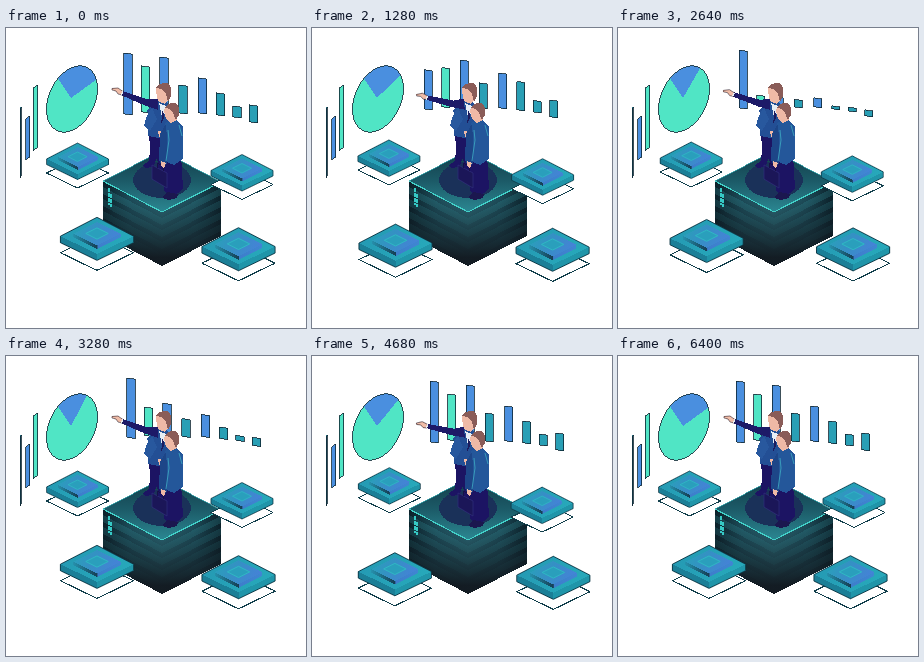
Recreate the animation shown at these times as an HTML page. Size 300x300 px, loop 6440 ms.

```html
<!DOCTYPE html>
<html lang="en">
<head>
<meta charset="utf-8">
<style>
html, body { margin: 0; width: 100%; height: 100%; overflow: hidden; background: #fff; }
svg { display: block; width: 100%; height: 100%; shape-rendering: crispEdges; }
</style>
</head>
<body>
<svg viewBox="0 0 300 300">
  <defs>
    <linearGradient id="leftSide">
      <stop stop-color="#0b2029"/><stop offset=".45" stop-color="#1c4a57"/><stop offset="1" stop-color="#2a6876"/>
    </linearGradient>
    <linearGradient id="rightSide">
      <stop stop-color="#2a6876"/><stop offset=".55" stop-color="#1c4a57"/><stop offset="1" stop-color="#0b2029"/>
    </linearGradient>
    <linearGradient id="fade" x2="0" y2="1">
      <stop offset=".2" stop-color="#12181f" stop-opacity="0"/><stop offset=".9" stop-color="#12181f" stop-opacity=".95"/>
    </linearGradient>
    <linearGradient id="lid" x2="0" y2="1">
      <stop stop-color="#123c49"/><stop offset=".5" stop-color="#1c5b68"/><stop offset="1" stop-color="#2b8792"/>
    </linearGradient>
    <linearGradient id="tile" x2="1" y2=".4">
      <stop stop-color="#2497b2"/><stop offset="1" stop-color="#27a8ba"/>
    </linearGradient>
    <linearGradient id="chip" x2="1" y2=".3">
      <stop stop-color="#27a3b8"/><stop offset=".5" stop-color="#3590c4"/><stop offset="1" stop-color="#4483d6"/>
    </linearGradient>
    <linearGradient id="chipSide">
      <stop stop-color="#2690ac"/><stop offset=".5" stop-color="#153f55"/><stop offset=".52" stop-color="#3d7ecb"/><stop offset="1" stop-color="#3f86d2"/>
    </linearGradient>
    <g id="platform" stroke-linejoin="round">
      <path d="M0 15L31 30 0 45-31 30Z" fill="#fff" stroke="#123f4c"/>
      <path d="M-31 16V21.5L0 36.5V31Z" fill="#1b7f97"/>
      <path d="M31 16V21.5L0 36.5V31Z" fill="#2095a9"/>
      <path d="M0 0L31 16 0 31-31 16Z" fill="url(#tile)"/>
      <path d="M0 0L31 16V21.5L0 36.5-31 21.5V16Z" fill="none" stroke="#0f3a48" stroke-width=".8"/>
      <path d="M-20 14V17L0 27 20 17V14Z" fill="url(#chipSide)"/>
      <path d="M0 4L20 14 0 24-20 14Z" fill="url(#chip)"/>
      <path d="M0 9L9.5 13.7 0 18.5-9.5 13.7Z" fill="#2a9fbc" stroke="#2fb9c4" stroke-width=".8"/>
    </g>
    <clipPath id="pie"><ellipse rx="23" ry="35" transform="rotate(25)"/></clipPath>
  </defs>

  <g stroke="#0c2430" stroke-width=".8">
    <path d="M14 80L15.3 78.5V148L14 150Z" fill="#1d6f80"/>
    <path d="M19.7 91L23.7 88V129L19.7 132Z" fill="#4a8fdf"/>
    <path d="M27 60L31.7 57V119L27 123Z" fill="#50e5c5"/>
  </g>
  <g transform="translate(66 71)">
    <g clip-path="url(#pie)">
      <path d="M-40-40H40V40H-40Z" fill="#50e5c5"/>
      <path id="slice" fill="#4a8fdf"/>
    </g>
    <ellipse rx="23" ry="35" transform="rotate(25)" fill="none" stroke="#0c2430" stroke-width=".8"/>
  </g>
  <g id="bars" stroke="#0c2430" stroke-width=".8"></g>

  <g>
    <path d="M97 153L156 184V238L97 207Z" fill="url(#leftSide)"/>
    <path d="M215 154L156 184V238L215 208Z" fill="url(#rightSide)"/>
    <g id="layers" fill="#36a0a8"></g>
    <path d="M97 153L156 184 215 154V208L156 238 97 207Z" fill="url(#fade)"/>
    <path d="M156 123L215 154 156 184 97 153Z" fill="url(#lid)" stroke="#2a9ca3" stroke-width=".8"/>
    <path d="M97 153L156 184 215 154" fill="none" stroke="#42d0c8" stroke-width="1.2"/>
    <ellipse cx="156" cy="152" rx="29" ry="18" fill="#1a3159"/>
    <path d="M103 160V177M105 166V179" stroke="#36c9c5" stroke-width="1.2" stroke-dasharray="4 1"/>
  </g>

  <g id="platforms"></g>

  <g stroke-linejoin="round">
    <path d="M143 104L144 122 143 133 137 137 139 140 147 139 151 130 153 143H160L163 102Z" fill="#1c1463"/>
    <path d="M151 72L160 73 166 80 165 108 158 111 142 108Q144 92 141 82Z" fill="#234f95"/>
    <path d="M153 75L160 78 157 94Z" fill="#e6edf5"/>
    <path d="M157 79L158 90 155 96Z" fill="#1d1c5e"/>
    <path d="M146 80Q140 86 138 98L144 103 151 91Z" fill="#28589e"/>
    <path d="M152 103L158 104 158 109 153 109Z" fill="#efb9a6"/>
    <g id="arm">
      <path d="M152 71L142 71.5 117 63 115 67 140 78 152 82Z" fill="#1d1a68"/>
      <path d="M117 63.5L112 60 106 60.5 106 62 110 63 112 66 116 67Z" fill="#f0bda8" stroke="#33252f" stroke-width=".6"/>
      <path d="M117 63.5L115 67" stroke="#e6edf5" stroke-width="1.3"/>
    </g>
    <path d="M150 63Q150 57 157 56L164 59 164 70 159 76 152 73Z" fill="#efb9a6"/>
    <path d="M150 60Q154 54 161 55 167 58 165 68L162 74 160 66 156 61Z" fill="#8a5c58"/>

    <path d="M158 126L158 163 165 168 172 165 177 160 175 126Z" fill="#1c1463"/>
    <path d="M157 168L161 164 172 166 171 170 163 172 158 171Z" fill="#1b174f"/>
    <path d="M146 137L161 145V160L146 151Z" fill="#1b1658" stroke="#30307c" stroke-width=".7"/>
    <path d="M151 140V135L157 138V143" fill="none" stroke="#171247"/>
    <path d="M160 94L169 91 177 98 177 131 168 137 156 132Q158 117 155 106Z" fill="#24579a"/>
    <path d="M160 96L154 106 153 132 157 139 161 135 161 112Z" fill="#1d4688"/>
    <path d="M162 102L163 112 160 133M173 97L176 108" fill="none" stroke="#3ba3bf" stroke-width=".9"/>
    <path d="M155 133L160 135 158 140 155 138Z" fill="#efb9a6"/>
    <path d="M158 83Q159 76 167 76L173 81 171 92 165 95 160 91Z" fill="#efb9a6"/>
    <path d="M159 80Q162 74 169 75 175 78 173 87L170 92 167 85 164 81Z" fill="#8a5c58"/>
  </g>
</svg>
<script>
const LOOP = 6440;
const TAU = Math.PI * 2;
const BLUE = '#4a8fdf', MINT = '#50e5c5', TEAL = '#299fb5';
const byId = id => document.getElementById(id);

function add(parent, tag, attrs) {
  const node = document.createElementNS('http://www.w3.org/2000/svg', tag);
  for (const key in attrs) node.setAttribute(key, attrs[key]);
  return parent.appendChild(node);
}

// Eased interpolation between [time, value] stops.
function track(stops, t) {
  const i = stops.findIndex(stop => stop[0] > t);
  if (i < 0) return stops[stops.length - 1][1];
  const [t0, a] = stops[i - 1], [t1, b] = stops[i];
  const u = (t - t0) / (t1 - t0);
  return a + (b - a) * u * u * (3 - 2 * u);
}

// Height scales at 1280, 2000, 2640 and 3920 ms.
const bars = [
  [118, 87, 62, BLUE, [.65, .1, .95, 1]],
  [135.5, 85, 47, MINT, [.86, .15, .25, 1]],
  [154, 86, 57, BLUE, [.86, .15, .2, 1]],
  [173, 86, 29, TEAL, [.9, .2, .3, 1]],
  [192.5, 86, 36, BLUE, [1, .3, .28, 1]],
  [210.5, 88, 23, TEAL, [1.28, .4, .18, .9]],
  [227, 90, 12, TEAL, [1.05, .6, .4, .62]],
  [243.5, 95, 18, TEAL, [1, .7, .39, .62]]
].map(([x, base, height, fill, s]) => ({
  x, base, height,
  stops: [[0, 1], [500, 1], [1280, s[0]], [2000, s[1]], [2640, s[2]], [3920, s[3]], [4600, 1]],
  node: add(byId('bars'), 'path', { fill })
}));
const shiftX = [[0, 0], [1280, -6], [1500, -6], [2640, 3], [3200, 3], [4600, 0]];
const shiftY = [[0, 0], [1280, -5], [2640, -6], [3920, -3], [4600, 0]];

// Rest position, scale and travel of each floating platform.
const platforms = [
  [71.5, 115, 1, 6, -3.4],
  [236, 126.5, 1, -6, 4.7],
  [91, 189.3, 1.18, -8.3, 7.6],
  [232.5, 199.7, 1.18, 9, .6]
].map(([x, y, scale, dx, dy]) => ({
  x, y, scale, dx, dy, node: add(byId('platforms'), 'use', { href: '#platform' })
}));

for (let i = 0; i < 4; i++) {
  const y = 6 + i * 12;
  add(byId('layers'), 'path', {
    d: `M97 ${153 + y}L156 ${184 + y} 215 ${154 + y}v7L156 ${191 + y} 97 ${160 + y}Z`, opacity: .22 - i * .03
  });
}

function drawBar({ x, base, height, stops, node }, t) {
  const left = x + track(shiftX, t), bottom = base + track(shiftY, t);
  const top = bottom - height * track(stops, t);
  node.setAttribute('d', `M${left} ${top}l8.3 1.2V${bottom}l-8.3 -1.2Z`);
}

function drawSlice(t) {
  const end = -.88 + .23 * Math.cos(TAU * t / LOOP);
  byId('slice').setAttribute('d', `M-1 -1L-34 -50H40L${60 * Math.cos(end)} ${60 * Math.sin(end)}Z`);
}

function render(t) {
  const sway = (1 - Math.cos(TAU * t / (LOOP / 2))) / 2;
  for (const { x, y, scale, dx, dy, node } of platforms) {
    node.setAttribute('transform', `translate(${x + dx * sway} ${y + dy * sway}) scale(${scale})`);
  }
  byId('arm').setAttribute('transform', `rotate(${-8.5 * sway} 150 75)`);
  bars.forEach(bar => drawBar(bar, t));
  drawSlice(t);
}

const start = performance.now();
function tick() {
  render((performance.now() - start) % LOOP);
  requestAnimationFrame(tick);
}
tick();
</script>
</body>
</html>
```
